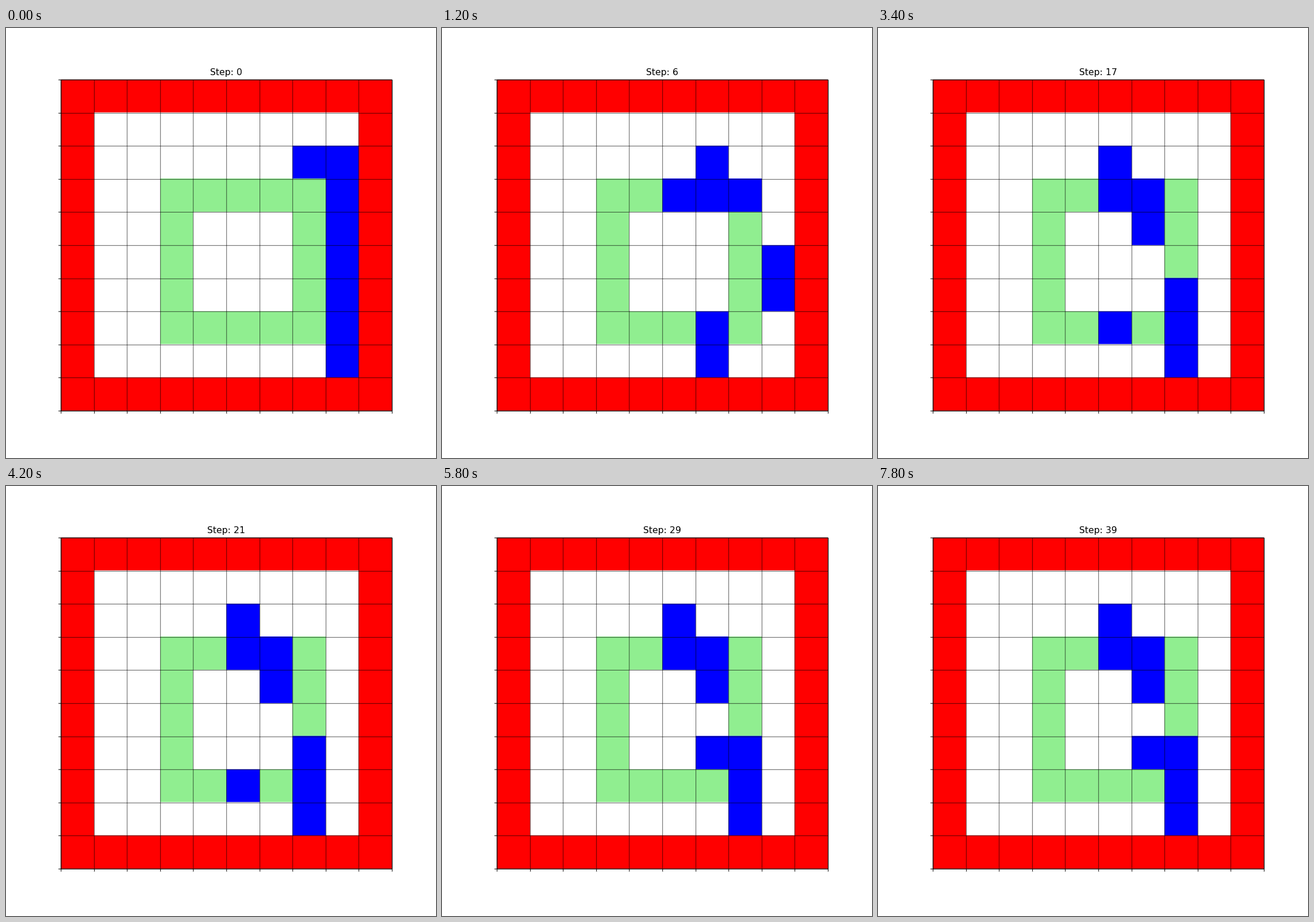
Recreate the animation shown at these times as a matplotlib script. Size 748 px wide and 748 px high, loop 8000 ms.

```python
import matplotlib.pyplot as plt
import numpy as np
from matplotlib.animation import FuncAnimation

# The stage is laid out in hundredths of an inch: 800 units shown on 748 pixels.
UNITS, DPI = 800, 93.5
LEFT, TOP, SIDE = 102, 96, 616
CELLS, STEPS, INTERVAL = 10, 40, 200
EMPTY, WALL, BLOCK, GOAL = range(4)
COLORS = np.array([(255, 255, 255), (255, 0, 0), (0, 0, 255), (144, 238, 144)],
                  dtype=np.uint8)
MOVES = {"L": (-1, 0), "R": (1, 0), "U": (0, -1), "D": (0, 1), ".": (0, 0)}

# Start cell (column, row) and one move per step for each block.
BLOCKS = [
    ((7, 2), "L.L" + "RL" * 18),
    ((8, 2), "LDL" + "RL" * 18),
    ((8, 3), "LLL" + "." * 36),
    ((8, 4), "L.L" + "LR" + "UD" + "LR" * 3 + "RL" * 6 + "LR" * 3 + "RL" * 4),
    ((8, 5), "LR" * 6 + "LLLDD" + "LR" * 3 + "L" + "LRRUR" + "LL" + "RL" * 3 + "RR"),
    ((8, 6), "L" + "RL" * 5 + "LR" * 2 + "RL" * 7 + "UD" * 4 + "RL"),
    ((8, 7), "L" + "LR" * 19),
    ((8, 8), "L" + "LR" * 19),
]


def trace(start, moves):
    steps = [start] + [MOVES[m] for m in moves]
    return np.cumsum(steps, axis=0)


def make_board():
    board = np.full((CELLS, CELLS), WALL)
    board[1:-1, 1:-1] = EMPTY
    board[3:8, 3:8] = GOAL
    board[4:7, 4:7] = EMPTY
    return board


BOARD = make_board()
PATHS = [trace(start, moves) for start, moves in BLOCKS]
OFFSETS = SIDE / CELLS * np.arange(CELLS + 1)
EDGES = np.round(OFFSETS).astype(int)
WIDTHS = np.diff(EDGES)
HEIGHTS = np.diff(np.floor(OFFSETS).astype(int))


def paint(step):
    board = BOARD.copy()
    for path in PATHS:
        col, row = path[step]
        board[row, col] = BLOCK
    cells = np.full((UNITS, UNITS), EMPTY)
    cells[TOP:TOP + SIDE, LEFT:LEFT + SIDE] = (
        board.repeat(HEIGHTS, axis=0).repeat(WIDTHS, axis=1))
    return COLORS[cells]


fig = plt.figure(figsize=(UNITS / 100, UNITS / 100), dpi=DPI)
ax = fig.add_axes([0, 0, 1, 1])
ax.axis("off")
image = ax.imshow(paint(0), extent=(0, UNITS, UNITS, 0),
                  interpolation="bilinear")

# Lines run through the middle of a unit.
xs, ys = LEFT + EDGES + 0.5, TOP + EDGES + 0.5
x0, x1, y0, y1 = xs[0], xs[-1], ys[0], ys[-1]
tick = 3.5 * 100 / 72
grid = dict(colors="black", linewidth=0.5, snap=False)
frame = dict(colors="black", linewidth=0.8, snap=False)
ax.vlines(xs, y0, y1, **grid)
ax.hlines(ys, x0, x1, **grid)
ax.vlines([x0, x1], y0, y1, **frame)
ax.hlines([y0, y1], x0, x1, **frame)
ax.vlines(xs, y1, y1 + tick, **frame)
ax.hlines(ys, x0 - tick, x0, **frame)
ax.set(xlim=(0, UNITS), ylim=(UNITS, 0))
title = ax.text(LEFT + SIDE / 2, TOP - 6 * 100 / 72, "Step: 0",
                fontsize=12, ha="center", va="baseline")


def update(step):
    image.set_data(paint(step))
    title.set_text(f"Step: {step}")
    return image, title


anim = FuncAnimation(fig, update, frames=STEPS, interval=INTERVAL,
                     repeat=True, repeat_delay=0, blit=False)
plt.show()
```
